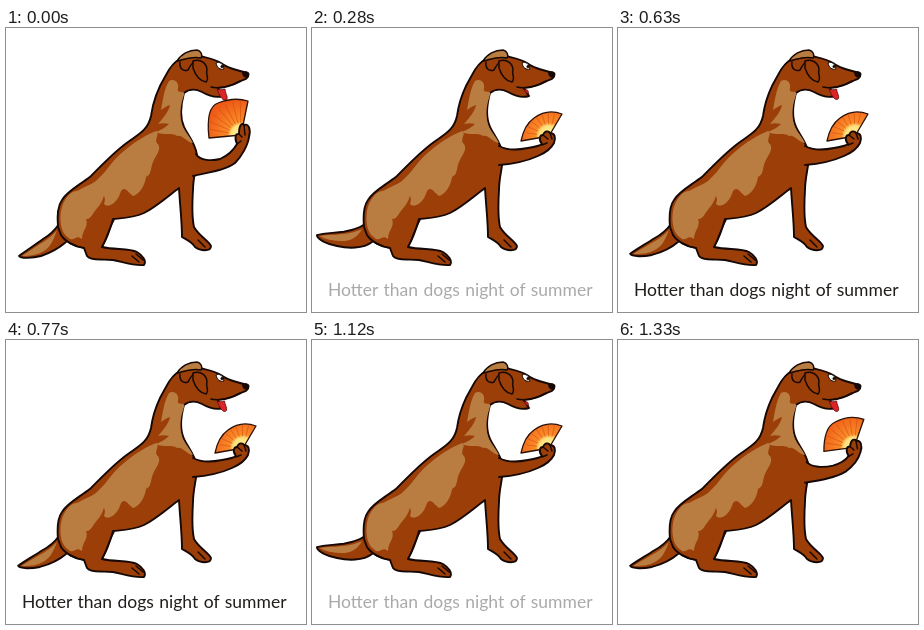
These frames come from a looping animation (300 px wide and 284 px high, 1400 ms). An HTML page:

```html
<!DOCTYPE html>
<html lang="en">
<head>
<meta charset="utf-8">
<title>Hot dog night</title>
<style>
  html, body { margin: 0; width: 100%; height: 100%; overflow: hidden; background: #fff; }
  svg { display: block; width: 300px; height: 284px; }
  .coat { fill: #9b3e08; stroke: #160804; stroke-width: 1.9; stroke-linejoin: round; stroke-linecap: round; }
  .tan { fill: #b97d42; }
  .ink { fill: none; stroke: #160804; stroke-width: 1.5; stroke-linecap: round; stroke-linejoin: round; }
  text { font: 17.5px Lato, "Open Sans", sans-serif; word-spacing: 1px; fill: #211d1b; }
</style>
</head>
<body>
<svg viewBox="0 0 300 284">
  <defs>
    <radialGradient id="silk" gradientUnits="userSpaceOnUse" r="36">
      <stop offset="0" stop-color="#fff3a0"/>
      <stop offset=".28" stop-color="#ffe07a"/>
      <stop offset=".38" stop-color="#fa8a28"/>
      <stop offset="1" stop-color="#ee5a16"/>
    </radialGradient>
  </defs>

  <path id="tail" class="coat"/>
  <path id="tailTan" class="tan"/>

  <path class="coat" d="M52 199C51 188 51 179 56 172C61 163 74 157 85 148
    C96 137 108 124 122 114C133 106 142 102 145 88C147 73 152 60 160 47C164 39 168 34 174 31
    C180 27 186 25 194 28C202 30 209 31 215 35C222 41 232 42 241 45
    C244 48 241 51 237 52C231 55 225 59 212 60L217 68C211 70 203 68 196 64
    C190 61 183 61 178 65C175 76 173 88 178 99C182 108 189 114 191 127
    C191 138 187 149 187 162C186 178 186 190 188 199C193 208 203 213 205 218
    C205 224 194 223 189 219C186 214 181 212 176 209C176 194 174 178 173 160
    C161 169 150 179 138 185C127 190 118 190 107 191C104 202 100 212 96 219
    C109 222 123 220 131 224C136 227 141 233 138 237C128 238 117 234 107 232
    C98 231 85 233 81 228L78 220C69 219 59 213 55 207Z"/>

  <g class="tan">
    <path d="M163 53C169 50 173 55 172 60C170 67 180 61 178 67C174 78 173 89 177 99C180 105 184 109 187 115
      C180 114 176 106 171 108C166 104 158 108 150 104C155 102 160 99 163 96C159 95 156 95 152 96
      C158 89 163 83 164 77C160 78 158 80 155 82C157 72 158 61 163 53Z"/>
    <path d="M150 103C155 105 147 112 152 116C156 122 149 128 147 134C144 141 146 146 140 149
      C139 157 134 166 127 168C121 164 120 158 115 163C112 174 103 181 98 176C101 168 96 163 88 168
      C82 170 76 164 69 165C79 157 87 157 92 151C101 143 107 131 118 123C128 114 140 107 150 103Z"/>
    <path d="M65 165C73 160 82 165 93 159C101 159 99 170 93 178C87 184 85 192 80 191C83 199 76 202 76 211
      C70 206 69 213 64 211C60 208 57 205 56 201C53 190 54 174 65 165Z"/>
  </g>
  <g class="ink">
    <path d="M108 192C102 203 100 212 96 219M55 207C59 214 69 219 78 220M126 228L133 234M130 226L137 232M192 212L199 219"/>
    <path d="M171 33C175 26 183 22 191 22C195 23 197 27 195 30C186 28 180 31 171 33Z" fill="#b97d42"/>
    <path d="M174 34C173 40 177 44 182 42C184 38 186 35 189 33"/>
    <path d="M187 33C195 30 201 36 201 42C199 46 204 50 200 54C193 53 189 46 187 40Z" fill="#9b3e08"/>
    <path d="M205 59C213 61 226 58 234 53"/>
  </g>
  <path d="M210 35C214 33 217 36 218 41C214 42 211 40 210 35Z" fill="#fff" stroke="#160804"/>
  <circle cx="216" cy="38.5" r="1.5" fill="#160804"/>
  <path d="M236 44C241 42 246 45 242 49C239 51 236 48 236 44Z" fill="#160804"/>
  <path id="tongue" fill="#dd2426" stroke="#5c0b0b" stroke-width=".8"/>

  <path id="fan" fill="url(#silk)" stroke="#2a1005" stroke-width="1.3" stroke-linejoin="round"/>
  <path id="ribs" fill="none" stroke="#c9440d" stroke-width=".5"/>
  <path id="arm" class="coat"/>
  <path id="fingers" class="ink"/>

  <text id="line" x="16" y="268">Hotter than dogs night of summer</text>
</svg>
<script>
const STEP = 70, COUNT = 20;
const $ = id => document.getElementById(id);
const clamp = v => Math.max(0, Math.min(1, v));
const mix = (a, b, u) => a + (b - a) * u;
const wave = turns => Math.cos(turns * 2 * Math.PI);
const put = (id, d) => $(id).setAttribute('d', d);

// Blends two paths that share the same commands.
function blend([a, b], u) {
  const to = b.match(/-?[\d.]+/g);
  let i = 0;
  return a.replace(/-?[\d.]+/g, n => mix(+n, +to[i++], u).toFixed(2));
}

// Each pair holds the two extreme poses of a moving part.
const TAIL = [
  'M53 196C49 202 44 207 37 211C29 217 21 222 13 228C15 231 27 230 35 228C44 225 52 221 60 214',
  'M53 196C46 201 38 202 31 203C21 204 11 203 4 205C5 210 15 215 24 217C35 220 51 221 60 214'
];
const TAIL_TAN = [
  'M51 202C46 208 41 212 34 216C28 220 22 224 16 228C24 228 32 227 38 223C44 219 47 214 51 202Z',
  'M50 201C42 204 37 205 30 205C21 206 13 205 7 206C13 210 19 211 26 212C36 213 44 211 50 201Z'
];
const TONGUE = [
  'M211 61C213 62 216 62 219 61C219 65 222 68 221 71C218 75 214 69 211 61Z',
  'M211 61C212 62 214 62 215 62C216 63 216 64 216 65C215 65 213 63 211 61Z'
];
const ARM = [
  'M187 118C194 122 206 122 216 120C222 119 228 118 230 116C226 111 228 107 231 107C233 102 237 103 238 105C243 105 244 110 242 115C239 121 233 125 226 128C215 133 201 136 187 137',
  'M190 126C194 133 206 133 214 131C221 128 227 123 231 116C228 109 230 105 233 106C233 95 237 95 238 97C243 95 245 102 243 109C242 117 236 128 229 135C220 142 204 144 187 148'
];
const FINGERS = [
  'M231 107L236 111M238 105L240 111M230 117L235 115',
  'M233 106L236 109M238 97L239 107M231 116L235 113'
];
const FAN = [
  'M237 108L209 113C211 103 215 95 222 90C230 84 240 82 250 86Z',
  'M235 107L203 110C201 92 203 78 212 75C222 71 232 70 242 73Z'
];

function drawFan(u) {
  const cx = mix(237, 235, u), cy = mix(108, 107, u);
  const reach = mix(23, 34, u), from = mix(172, 177, u), to = mix(300, 282, u);
  const at = (deg, r) => {
    const a = deg * Math.PI / 180;
    return `${cx + Math.cos(a) * r} ${cy + Math.sin(a) * r}`;
  };
  let ribs = '';
  for (let i = 1; i < 8; i++) {
    const deg = mix(from, to, i / 8);
    ribs += `M${at(deg, 12)}L${at(deg, reach)}`;
  }
  put('fan', blend(FAN, u));
  put('ribs', ribs);
  $('silk').setAttribute('cx', cx);
  $('silk').setAttribute('cy', cy);
}

function draw(n) {
  const sway = (1 - wave(n / 10)) / 2;
  const lift = clamp((wave(n * 3 / COUNT) - .2) / .75);
  put('tail', blend(TAIL, sway));
  put('tailTan', blend(TAIL_TAN, sway));
  put('tongue', blend(TONGUE, sway));
  put('arm', blend(ARM, lift));
  put('fingers', blend(FINGERS, lift));
  drawFan(lift);
  $('line').setAttribute('opacity', clamp((Math.min(n, COUNT - n) - 1) / 8));
}

const start = performance.now();
let shown = -1;
function tick() {
  const n = Math.floor((performance.now() - start) / STEP) % COUNT;
  if (n !== shown) draw(shown = n);
  requestAnimationFrame(tick);
}
tick();
</script>
</body>
</html>
```
